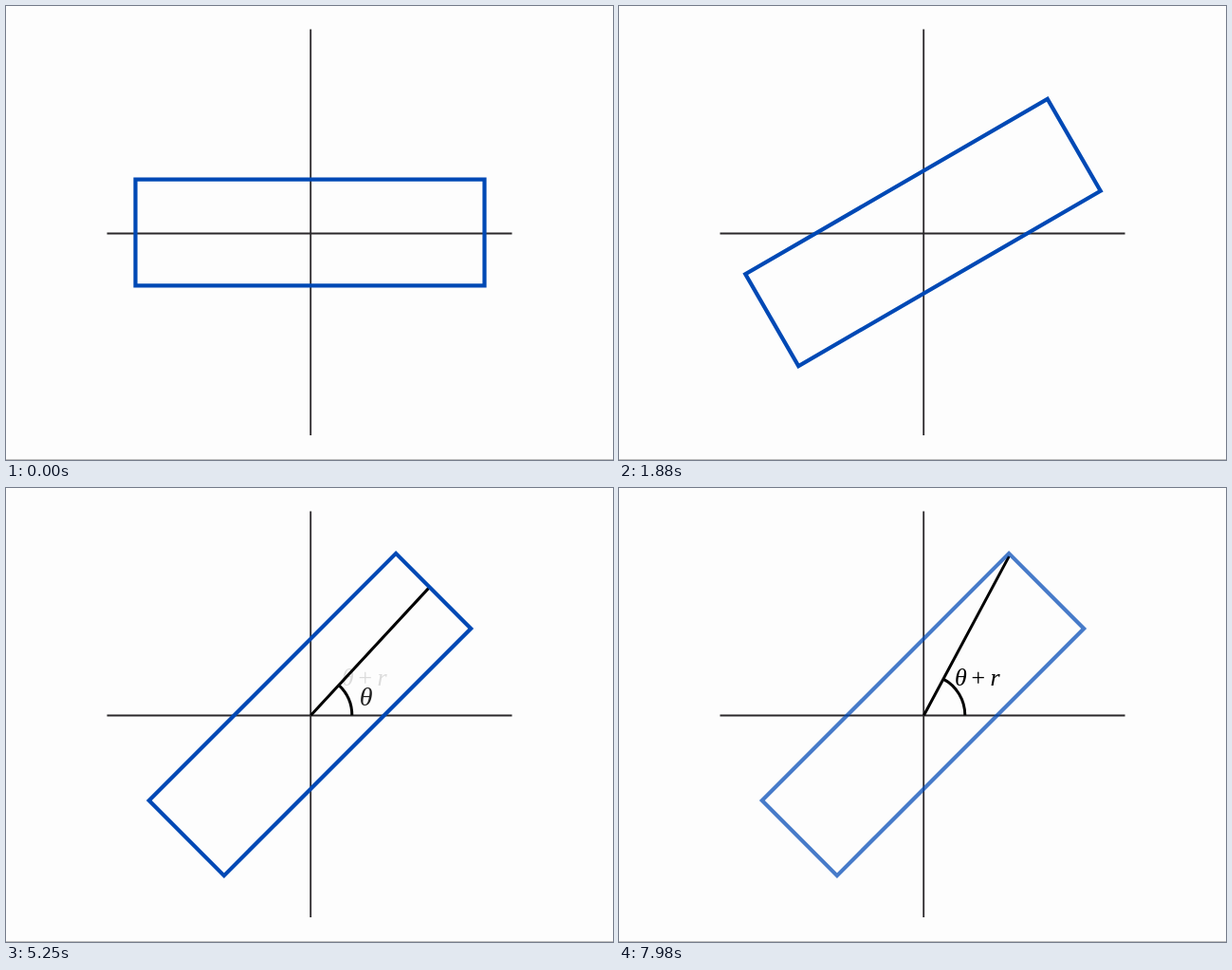
An HTML page that plays this animation: 640 by 478 pixels, repeating every 8 s.

```html
<!DOCTYPE html>
<html lang="en">
<head>
<meta charset="utf-8">
<title>Rotated rectangle</title>
<style>
  html, body { margin: 0; height: 100%; overflow: hidden; background: #fdfdfd; }
  svg { display: block; width: 640px; height: 478px; }
  text { font: italic 26px "Liberation Serif", "Noto Serif", serif; }
</style>
</head>
<body>
<svg viewBox="0 0 640 478" fill="none">
  <path d="M0 477.5H640" stroke="#bdbdbd"/>
  <path d="M106.5 239.5H533.5M321.2 24.5V452" stroke="#2b282b" stroke-width="1.8"/>
  <path id="angle" stroke="#000" stroke-width="3"/>
  <rect id="box" x="-184" y="-55.9" width="368" height="111.8" stroke="#0049b5" stroke-width="4.2"/>
  <g fill="#000">
    <text id="theta" x="372.8" y="229.3" style="font-size:28px">θ</text>
    <text id="sum" x="354 369.7 391.5" y="208">θ+r</text>
  </g>
</svg>
<script>
const LOOP = 8000, STEP = 1500;
const [angle, box, theta, sum] =
  ["angle", "box", "theta", "sum"].map(id => document.getElementById(id));

// Ease-in-out, the cubic Bézier (.42, 0, .58, 1), solved by bisection
function ease(x) {
  if (x <= 0) return 0;
  if (x >= 1) return 1;
  let lo = 0, hi = 1, s;
  for (let i = 0; i < 20; i++) {
    s = (lo + hi) / 2;
    const bx = 3 * s * (1 - s) ** 2 * .42 + 3 * s * s * (1 - s) * .58 + s ** 3;
    if (bx < x) lo = s; else hi = s;
  }
  return s * s * (3 - 2 * s);
}

const polar = (r, a) => `${321.5 + r * Math.cos(a)} ${239.3 - r * Math.sin(a)}`;

function draw(now) {
  const t = now % LOOP;
  const phase = start => ease((t - start) / STEP);
  const turn = phase(980), show = phase(2985), sweep = phase(4875), fade = phase(7175);

  box.setAttribute("transform", `translate(320.5 238.5) rotate(${-45 * turn})`);
  box.setAttribute("opacity", 1 - fade / 2);

  const a = (45 + 16.8 * sweep) * Math.PI / 180;
  angle.setAttribute("d",
    `M${polar(0, a)}L${polar(183.5 + 6.5 * sweep, a)}M${polar(43.3, 0)}A43.3 43.3 0 0 0 ${polar(43.3, a)}`);
  angle.setAttribute("opacity", show);
  theta.setAttribute("opacity", show * (1 - sweep));
  sum.setAttribute("opacity", sweep);
}

let begin;
function tick(now) {
  begin ??= now;
  draw(now - begin);
  requestAnimationFrame(tick);
}
draw(0);
requestAnimationFrame(tick);
</script>
</body>
</html>
```
